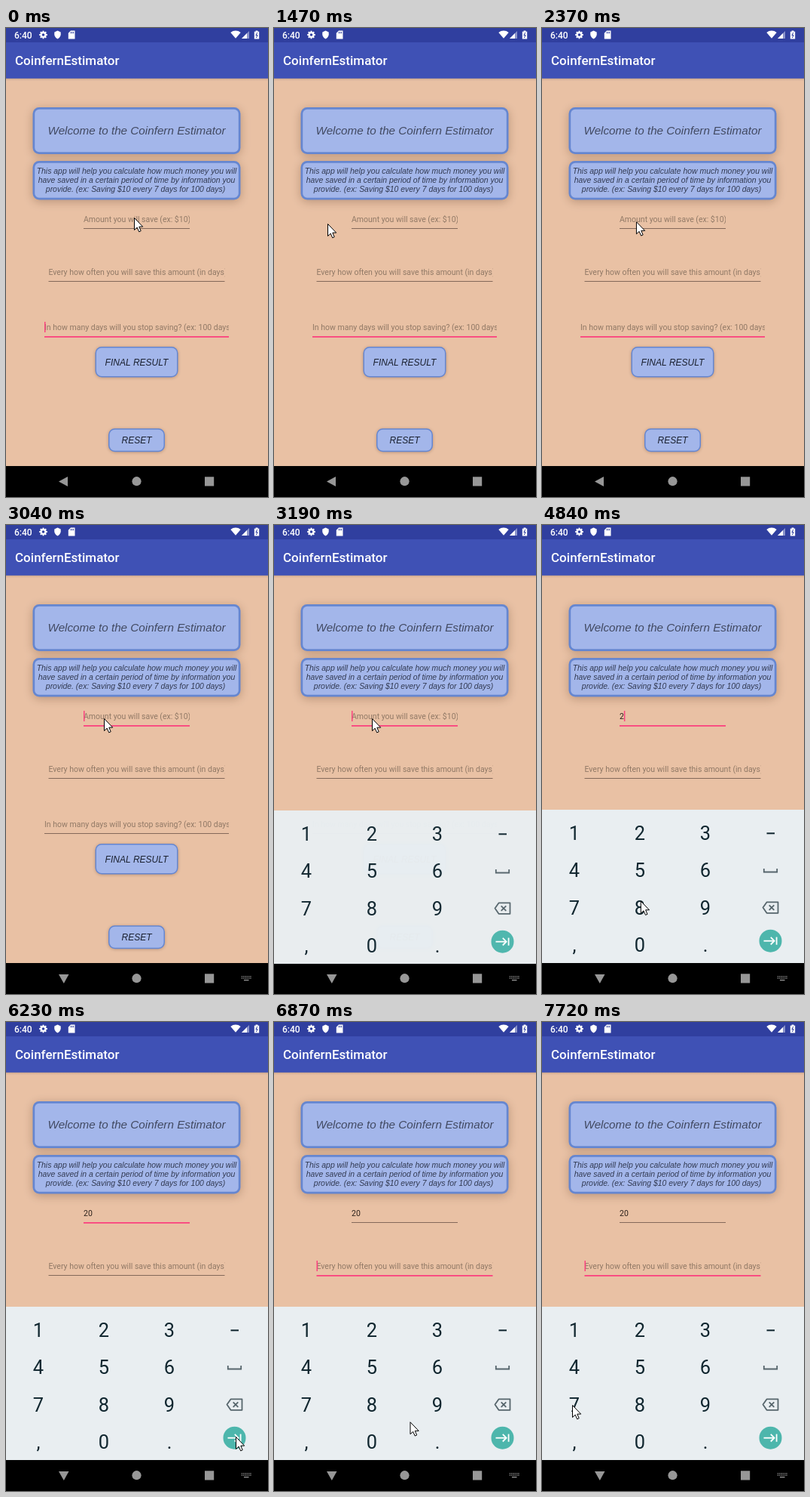
Recreate the animation shown at these times as an HTML page with a canvas. Size 348 by 621 pixels, loop 7.99 s.

```html
<!DOCTYPE html>
<html lang="en">
<head>
<meta charset="utf-8">
<title>Savings form</title>
<style>
html, body { margin: 0; width: 100%; height: 100%; overflow: hidden; background: #000; }
canvas { display: block; width: 348px; height: 621px; }
</style>
</head>
<body>
<canvas id="stage"></canvas>
<script>
const W = 348, H = 621, MID = 173.5, LOOP = 7990;
const canvas = document.getElementById('stage');
const dpr = window.devicePixelRatio || 1;
canvas.width = W * dpr;
canvas.height = H * dpr;
const ctx = canvas.getContext('2d');

const ROBOTO = 'Roboto, "Noto Sans", sans-serif';
const SANS = '"Liberation Sans", Arial, sans-serif';
const PINK = '#fb437f', BLUE = '#a3b6ea', EDGE = '#6586d0', PEACH = '#e9c1a4';
const BAR = '#303f9f', KEY = '#10262f', KEY_SOFT = '#56656c', NAV = '#979797';

// The pointer is sampled on a coarse tick; everything else switches at once.
const TICK = LOOP / 59, MOVE = 760, BLINK = 505;
const FOCUS_1 = 2700, NAV_SWAP = 3040, KEYBOARD = 3180;
const TYPE_2 = 4480, TYPE_0 = 5470, PRESS = 6360, FOCUS_2 = 6480;

// Pointer moves: when each starts and where it ends.
const moves = [
  { at: -MOVE, x: 170, y: 251 },
  { at: 690, x: 71, y: 259 },
  { at: 1900, x: 130, y: 256 },
  { at: 3250, x: 132, y: 414 },
  { at: 4600, x: 130, y: 555 },
  { at: 5465, x: 305, y: 549 },
  { at: 6700, x: 40, y: 507 }
];

const fields = [
  { w: 141, base: 257, hint: 'Amount you will save (ex: $10)' },
  { w: 234, base: 327, hint: 'Every how often you will save this amount (in days)' },
  { w: 245, base: 400, hint: 'In how many days will you stop saving? (ex: 100 days)' }
];

const keyX = col => 43 + 87 * col;
const keyY = row => 407.9 + 49.4 * row;

function pointerAt(time) {
  const t = Math.floor(time / TICK + 0.56) * TICK;
  let { x, y } = moves[0];
  for (const m of moves) {
    const u = Math.min(1, Math.max(0, (t - m.at) / MOVE));
    const e = u * (2 - u);
    x += (m.x - x) * e;
    y += (m.y - y) * e;
  }
  return [x, y];
}

function rect(x, y, w, h, color) {
  ctx.fillStyle = color;
  ctx.fillRect(x, y, w, h);
}

function poly(points, color) {
  ctx.beginPath();
  points.forEach(([x, y]) => ctx.lineTo(x, y));
  ctx.closePath();
  ctx.fillStyle = color;
  ctx.fill();
}

function disc(x, y, r, color) {
  ctx.beginPath();
  ctx.arc(x, y, r, 0, Math.PI * 2);
  ctx.fillStyle = color;
  ctx.fill();
}

function line(points, color, width = 1.8) {
  ctx.beginPath();
  points.forEach(([x, y]) => ctx.lineTo(x, y));
  ctx.strokeStyle = color;
  ctx.lineWidth = width;
  ctx.stroke();
}

function text(str, x, y, font, color, align = 'left') {
  ctx.font = font;
  ctx.fillStyle = color;
  ctx.textAlign = align;
  ctx.fillText(str, x, y);
}

// Rounded panel, centred on the stage, with an inset border and a soft shadow.
function panel(y, w, h, border, blur, shade) {
  const x = MID - w / 2, r = 8.5;
  ctx.save();
  ctx.shadowColor = `rgba(60,30,10,${shade})`;
  ctx.shadowBlur = blur * dpr;
  ctx.shadowOffsetY = blur / 5 * dpr;
  ctx.beginPath();
  ctx.roundRect(x, y, w, h, r);
  ctx.fillStyle = EDGE;
  ctx.fill();
  ctx.restore();
  ctx.beginPath();
  ctx.roundRect(x + border, y + border, w - 2 * border, h - 2 * border, r - border);
  ctx.fillStyle = BLUE;
  ctx.fill();
}

function card(y, h) {
  panel(y, 276, h, 2.7, 13, 0.28);
}

function button(label, y, w, h) {
  panel(y, w, h, 1.5, 4, 0.28);
  text(label, MID, y + h / 2 + 4.5, `italic 12px ${SANS}`, '#1b2130', 'center');
}

function statusBar() {
  rect(0, 0, W, 19, BAR);
  text('6:40', 11, 13.5, `500 12px ${ROBOTO}`, '#fff');

  // Gear
  disc(49.5, 9, 4, '#fff');
  for (let a = 0; a < Math.PI; a += Math.PI / 4) {
    const dx = 5.3 * Math.cos(a), dy = 5.3 * Math.sin(a);
    line([[49.5 - dx, 9 - dy], [49.5 + dx, 9 + dy]], '#fff', 2);
  }
  disc(49.5, 9, 1.8, BAR);

  // Shield
  ctx.beginPath();
  ctx.moveTo(68.5, 3.5);
  ctx.lineTo(72.7, 5.4);
  ctx.quadraticCurveTo(73.5, 12, 68.5, 14.5);
  ctx.quadraticCurveTo(63.5, 12, 64.3, 5.4);
  ctx.fillStyle = '#fff';
  ctx.fill();

  // Memory card
  poly([[86, 3.5], [91.5, 3.5], [91.5, 14.5], [82.8, 14.5], [82.8, 6.8]], '#fff');
  for (let i = 0; i < 3; i++) rect(85.6 + i * 1.8, 5, 0.9, 2.3, BAR);

  // Wi-Fi, signal, battery
  ctx.beginPath();
  ctx.moveTo(305, 13.8);
  ctx.arc(305, 13.8, 10.3, -Math.PI * 0.725, -Math.PI * 0.275);
  ctx.fillStyle = '#fff';
  ctx.fill();
  poly([[313, 14], [323, 14], [323, 4]], '#8b94ca');
  poly([[313, 14], [320, 14], [320, 7]], '#fff');
  rect(331.6, 3.5, 2.8, 2, '#fff');
  rect(329.8, 4.7, 6.4, 9.8, '#fff');
  line([[333.8, 6], [331.9, 9.5], [334.1, 9.5], [332.4, 13]], BAR, 1);
}

function page() {
  rect(0, 0, W, H, PEACH);
  const fade = ctx.createLinearGradient(0, 66, 0, 70);
  fade.addColorStop(0, 'rgba(50,30,30,.2)');
  fade.addColorStop(1, 'rgba(50,30,30,0)');
  rect(0, 66, W, 4, fade);
  statusBar();
  rect(0, 19, W, 47.8, '#3f51b5');
  text('CoinfernEstimator', 12, 49.3, `500 17px ${ROBOTO}`, '#fff');

  card(105, 62);
  card(176, 51.5);
  text('Welcome to the Coinfern Estimator', MID, 141.3, `italic 15.24px ${SANS}`, '#424a62', 'center');
  ['This app will help you calculate how much money you will',
    'have saved in a certain period of time by information you',
    'provide. (ex: Saving $10 every 7 days for 100 days) '
  ].forEach((s, i) =>
    text(s, MID, 193.3 + i * 11.7, `italic 10.45px ${SANS}`, '#323a52', 'center'));

  button('FINAL RESULT', 422, 110, 40.5);
  button('RESET', 530.3, 75, 31);
}

function field({ w, base, hint }, value, focused, caretOn) {
  const x = MID - w / 2;
  ctx.save();
  ctx.beginPath();
  ctx.rect(x - 1, base - 14, w + 1, 20);
  ctx.clip();
  text(value || hint, x, base, `10.5px ${ROBOTO}`, value ? '#2b211b' : '#917966');
  const end = value ? ctx.measureText(value).width : 0;
  ctx.restore();
  rect(x, base + 8, w, focused ? 1.8 : 1, focused ? PINK : '#84695a');
  if (caretOn) rect(x + end, base - 11, 1.5, 14, PINK);
}

function keyboard(alpha, dy, pressed) {
  ctx.save();
  ctx.globalAlpha = alpha;
  ctx.translate(0, dy);
  rect(0, 377, W, 203, '#e9eef1');
  ['123', '456', '789', ',0.'].forEach((keys, r) =>
    [...keys].forEach((k, c) =>
      text(k, keyX(c), keyY(r) + 9, `25.4px ${ROBOTO}`, KEY, 'center')));

  // Right column, drawn around its own centre line
  ctx.translate(303.5, 0);
  rect(-5, 407.3, 10.5, 2, KEY);
  line([[-8.7, 455], [-8.7, 459.5], [8.7, 459.5], [8.7, 455]], KEY_SOFT);

  ctx.lineJoin = 'round';
  ctx.translate(0, 506.6);
  line([[-10, 0], [-5, -7.2], [10, -7.2], [10, 7.2], [-5, 7.2], [-10, 0], [-5, -7.2]], KEY_SOFT);
  for (const s of [-1, 1]) line([[-1.8, -3.3 * s], [4.8, 3.3 * s]], KEY_SOFT);

  ctx.lineJoin = 'miter';
  ctx.translate(0, 44.1);
  disc(0, 0, 15, pressed ? '#45a59c' : '#4db6ac');
  line([[-9, 0], [4.5, 0]], '#fff');
  line([[0.3, -4.8], [5.1, 0], [0.3, 4.8]], '#fff');
  line([[8.1, -5.1], [8.1, 5.1]], '#fff');
  ctx.restore();
}

function navBar(open) {
  rect(0, 580, W, 41, '#000');
  poly(open ? [[70, 595], [83.5, 595], [76.8, 607]] : [[82, 594], [82, 607], [70, 600.5]], NAV);
  disc(MID, 600.2, 6.1, NAV);
  rect(264, 594.3, 12.2, 12.2, NAV);
  if (!open) return;
  for (let r = 0; r < 2; r++)
    for (let c = 0; c < 6; c++) rect(312.8 + c * 2.3, 597.2 + r * 2.3, 1.3, 1.3, NAV);
  rect(316, 602, 6.5, 1.3, NAV);
}

function pointer([x, y]) {
  ctx.save();
  ctx.translate(x + 0.5, y + 0.5);
  poly([[0, 0], [0, 16], [3.7, 12.6], [6.2, 18.3], [8.7, 17.2], [6.3, 11.6], [11.2, 11.6]], '#fff');
  ctx.strokeStyle = '#000';
  ctx.lineWidth = 1;
  ctx.stroke();
  ctx.restore();
}

function draw(t) {
  ctx.setTransform(dpr, 0, 0, dpr, 0, 0);
  page();

  const active = t < FOCUS_1 ? 2 : t < FOCUS_2 ? 0 : 1;
  const value = t < TYPE_2 ? '' : t < TYPE_0 ? '2' : '20';
  // The caret blink restarts at each focus change or key.
  const since = [270 - BLINK, FOCUS_1, TYPE_2, TYPE_0, FOCUS_2].filter(s => s <= t).pop();
  const blink = Math.floor((t - since) / BLINK) % 2 === 0;
  fields.forEach((f, i) =>
    field(f, i === 0 ? value : '', i === active, i === active && blink));

  navBar(t >= NAV_SWAP);
  if (t >= KEYBOARD) {
    const settling = t < KEYBOARD + TICK;
    keyboard(settling ? 0.98 : 1, settling ? 1 : 0, t >= PRESS && t < FOCUS_2);
  }
  pointer(pointerAt(t));
}

const start = performance.now();
function loop() {
  draw((performance.now() - start) % LOOP);
  requestAnimationFrame(loop);
}
loop();
</script>
</body>
</html>
```
